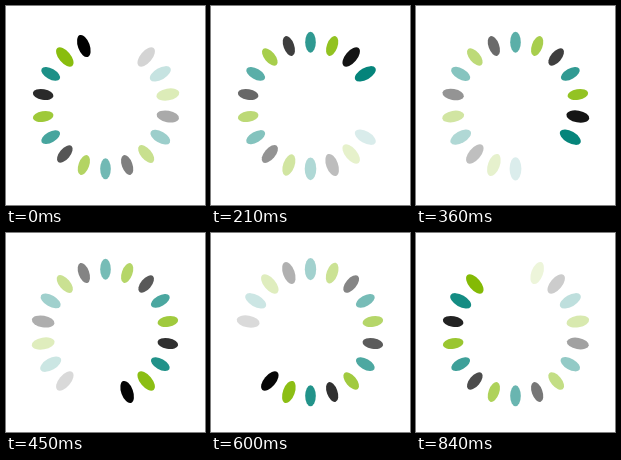
These frames come from a looping animation (199x199 px, 0.87 s). An HTML page with a canvas:

```html
<!DOCTYPE html>
<html lang="en">
<head>
<meta charset="utf-8">
<title>Loading spinner</title>
<style>
  html, body { margin: 0; width: 100%; height: 100%; overflow: hidden; background: #fff; }
  canvas { display: block; }
</style>
</head>
<body>
<canvas id="stage" width="199" height="199"></canvas>
<script>
const ctx = document.getElementById('stage').getContext('2d');
const LOOP = 870, STEP = 30, PETALS = 18, CENTER = 99.5, RADIUS = 63.3;
const COLORS = ['rgb(0,130,120)', 'rgb(130,185,0)', 'rgb(0,0,0)'];
const LAST_VISIBLE_AGE = 15.75;

// Fresh and nearly faded petals are slightly fuller than the ones between.
function petalScale(age) {
  if (age < 2) return 1;
  return 0.9 + 0.1 * Math.min(1, Math.max(0, (age - 9) / 4));
}

function drawPetal(index, age) {
  if (age > LAST_VISIBLE_AGE) return;
  const scale = petalScale(age);
  ctx.save();
  ctx.translate(CENTER, CENTER);
  ctx.rotate(index * 2 * Math.PI / PETALS);
  ctx.globalAlpha = 1 - age / PETALS;
  ctx.fillStyle = COLORS[index % COLORS.length];
  ctx.beginPath();
  ctx.ellipse(0, -RADIUS, 5.9 * scale, 11.6 * scale, 0, 0, 2 * Math.PI);
  ctx.fill();
  ctx.restore();
}

function draw(time) {
  const tick = Math.floor((time % LOOP) / STEP);
  const head = PETALS - 1 + PETALS * tick * STEP / LOOP;
  ctx.fillStyle = '#fff';
  ctx.fillRect(0, 0, 199, 199);
  for (let i = 0; i < PETALS; i++) drawPetal(i, (head - i) % PETALS);
}

const start = performance.now();
function frame() {
  draw(performance.now() - start);
  requestAnimationFrame(frame);
}
frame();
</script>
</body>
</html>
```
